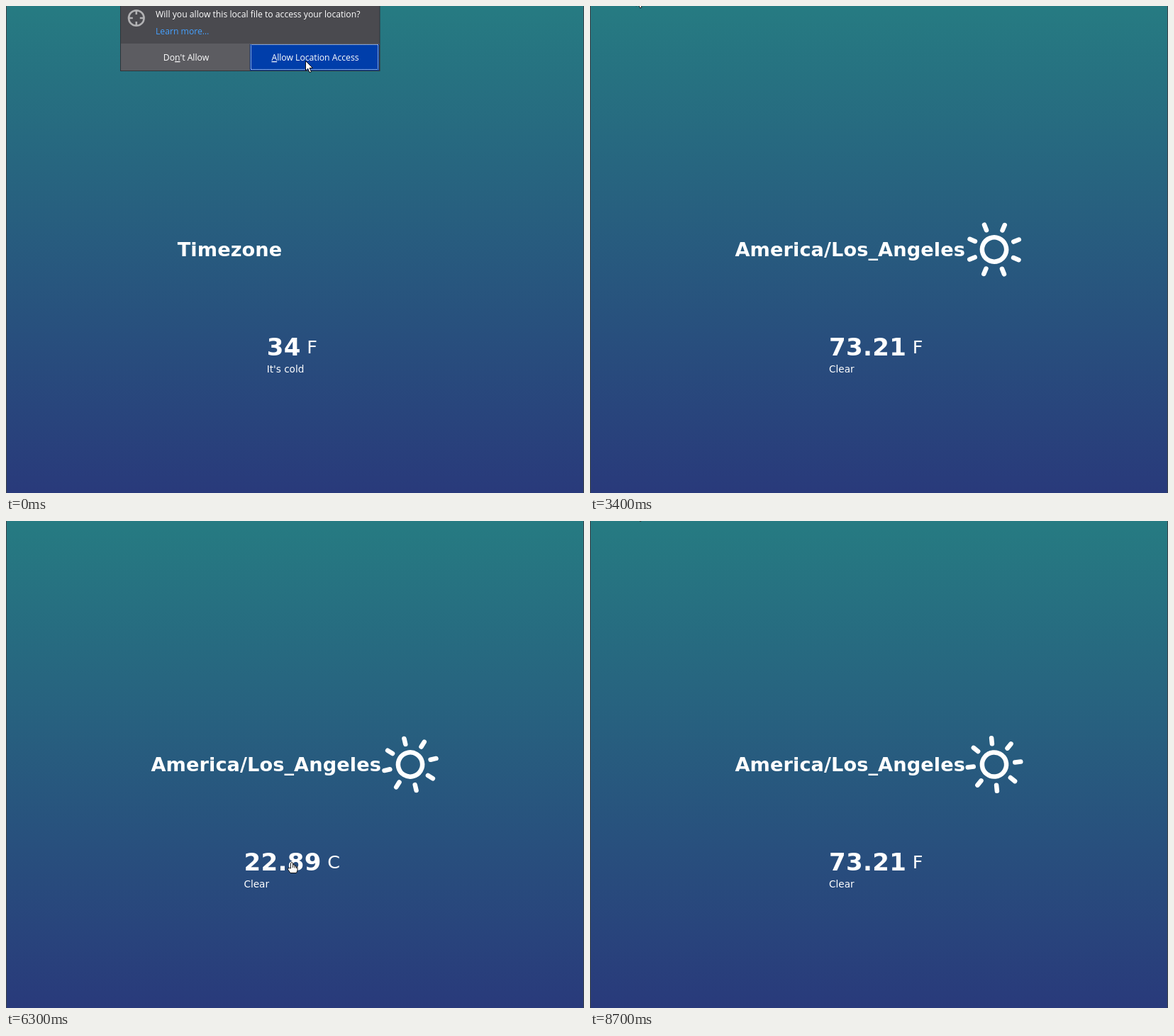
Recreate the animation shown at these times as an HTML page. Size 815x687 px, loop 8800 ms.

```html
<!DOCTYPE html>
<html lang="en">
<head>
<meta charset="utf-8">
<title>Weather</title>
<style>
  html, body { margin: 0; width: 100%; height: 100%; overflow: hidden; }
  svg { display: block; width: 815px; height: 687px; }
  text { fill: #fff; white-space: pre; }
  .app { font-family: "DejaVu Sans", sans-serif; }
  .bold { font-weight: bold; }
  .zone { font-size: 27.2px; letter-spacing: .08px; }
  .degree { font-size: 34px; letter-spacing: .35px; }
  .unit { font-size: 25.5px; }
  .note { font-size: 13.6px; }
  .ask { font: 500 12.2px "Open Sans", "Noto Sans", sans-serif; }
  .key { text-decoration: underline; }
  .cursor { fill: #fff; stroke: #111; stroke-linejoin: round; }
</style>
</head>
<body>
<svg viewBox="0 0 815 687">
  <defs>
    <linearGradient id="sky" x2="0" y2="1">
      <stop stop-color="#267b82"/>
      <stop offset="1" stop-color="#293a7b"/>
    </linearGradient>
  </defs>
  <rect width="815" height="687" fill="url(#sky)"/>
  <path d="M.5 0V687M814.5 0V687" stroke="#3b4248"/>

  <g class="app">
    <text id="zone" class="zone bold" y="353"></text>
    <text id="degree" class="degree bold" y="493"></text>
    <text id="unit" class="unit" y="489.5"></text>
    <text id="note" class="note" y="517"></text>
  </g>

  <g id="sun" fill="none" stroke="#fff" stroke-width="6.5" stroke-linecap="round">
    <circle r="17.1"/>
    <g id="rays"></g>
  </g>

  <g id="dialog" class="ask">
    <path d="M161 0H527.5V92H161Z" fill="#303338"/>
    <path d="M162 0H526.5V91H162Z" fill="#4a4a4f"/>
    <path d="M162 53.5H526.5" stroke="#5c5c61"/>
    <path d="M162 54H343.5V91H162Z" fill="#5c5c61"/>
    <path d="M344 54H526V91H344Z" fill="#003eaa"/>
    <path d="M345.5 54.5H524.5V89.5H345.5Z" fill="none" stroke="#fff" stroke-dasharray="1" stroke-dashoffset=".5"/>
    <g transform="translate(183.8 17)" fill="none" stroke="#b1b1b3" stroke-width="2.6">
      <circle r="10.8"/>
      <path d="M0-11V-5M0 11V5M-11 0H-5M11 0H5"/>
    </g>
    <text x="211" y="16">Will you allow this local file to access your location?</text>
    <text x="211" y="40" style="fill:#45a1ff">Learn more…</text>
    <text x="254" y="77" text-anchor="middle">Do<tspan class="key">n</tspan>'t Allow</text>
    <text x="436" y="77" text-anchor="middle"><tspan class="key">A</tspan>llow Location Access</text>
  </g>

  <path id="arrow" class="cursor" d="M.5.5V14.2L3.7 11.2 6 16.8 8.4 15.8 6.1 10.4H10.4Z"/>
  <g id="hand" class="cursor">
    <path d="M-1.5 9V1.5Q0-.5 1.5 1.5V5.5Q3-.2 4.2 6 5.8 4.6 6.5 7 8 6 8 8V12L6.5 15.5H-2L-5.5 10.5Q-5.5 8-3.5 8.5Z"/>
    <path d="M1.5 5.5V8M4.2 6V8.5M6.5 7V9" fill="none"/>
  </g>
</svg>
<script>
const LOOP = 8800, STEP = 100, WIDTH = 815;
const LOADED = 3400, GAP = 8.5, SUN = 81.6, BLANK_ICON = 184;
const el = id => document.getElementById(id);

const button = [422, 77], below = [420.5, 127], readout = [403, 481], edge = [64.5, -14];

// Each glide eases from one point to another, then rests until hidden
const glides = [
  { start: 600, end: 900, show: 0, hide: 1500, from: button, to: below },
  { start: 1500, end: 1600, hide: 1700, from: below, to: [277.5, 88] },
  { start: 2700, end: 2800, show: 2500, hide: 4000, from: [92, -16.5], to: edge },
  { start: 4500, end: 5600, hide: 6900, from: [103, -10], to: readout },
  { start: 6900, end: 7300, hide: 7300, from: readout, to: edge },
  { start: 7500, end: 8700, hide: LOOP, from: [62, -13.5], to: [64.5, -16.3] }
];

const states = {
  waiting: { zone: "Timezone", degree: "34", unit: "F", note: "It's cold" },
  fahrenheit: { zone: "America/Los_Angeles", degree: "73.21", unit: "F", note: "Clear" },
  celsius: { zone: "America/Los_Angeles", degree: "22.89", unit: "C", note: "Clear" }
};

el("rays").innerHTML = Array.from({ length: 8 }, (_, i) =>
  `<path d="M29.4 0H37.5" transform="rotate(${i * 45})"/>`).join("");

const setX = (id, x) => el(id).setAttribute("x", x);
const textWidth = id => el(id).getComputedTextLength();
const easeOut = k => 1 - (1 - k) ** 3;

function toggle(id, visible) {
  el(id).style.display = visible ? "" : "none";
}

// Both rows are centred on the stage
function layout(state, iconWidth) {
  for (const id in state) el(id).textContent = state[id];
  setX("zone", (WIDTH - textWidth("zone") - iconWidth) / 2);
  const left = (WIDTH - textWidth("degree") - textWidth("unit") - 2 * GAP) / 2;
  setX("degree", left);
  setX("note", left);
  setX("unit", left + textWidth("degree") + GAP);
}

function placePointer(t) {
  const glide = glides.find(g => t >= (g.show ?? g.start) && t < g.hide);
  toggle("arrow", false);
  toggle("hand", false);
  if (!glide) return;
  const { start, end, from, to } = glide;
  const k = easeOut(Math.min(1, Math.max(0, (t - start) / (end - start))));
  const [x, y] = from.map((a, i) => a + (to[i] - a) * k);
  const shape = y > 462 ? "hand" : "arrow";
  toggle(shape, true);
  el(shape).setAttribute("transform", `translate(${x} ${y})`);
}

function render(time) {
  const t = Math.floor(time % LOOP / STEP) * STEP;
  const loaded = t >= LOADED;
  const celsius = t >= 6200 && t < 6800;
  const name = !loaded ? "waiting" : celsius ? "celsius" : "fahrenheit";
  layout(states[name], loaded ? SUN : BLANK_ICON);

  toggle("sun", loaded);
  // Three degrees per second
  const angle = -21.9 + (t - LOADED) * 0.003;
  el("sun").setAttribute("transform", `translate(570 343.5) rotate(${angle})`);

  toggle("dialog", t < 400);
  el("dialog").style.opacity = t < 300 ? 1 : 0.5;

  placePointer(t);
}

const began = performance.now();
function tick() {
  render(performance.now() - began);
  requestAnimationFrame(tick);
}
tick();
</script>
</body>
</html>
```
